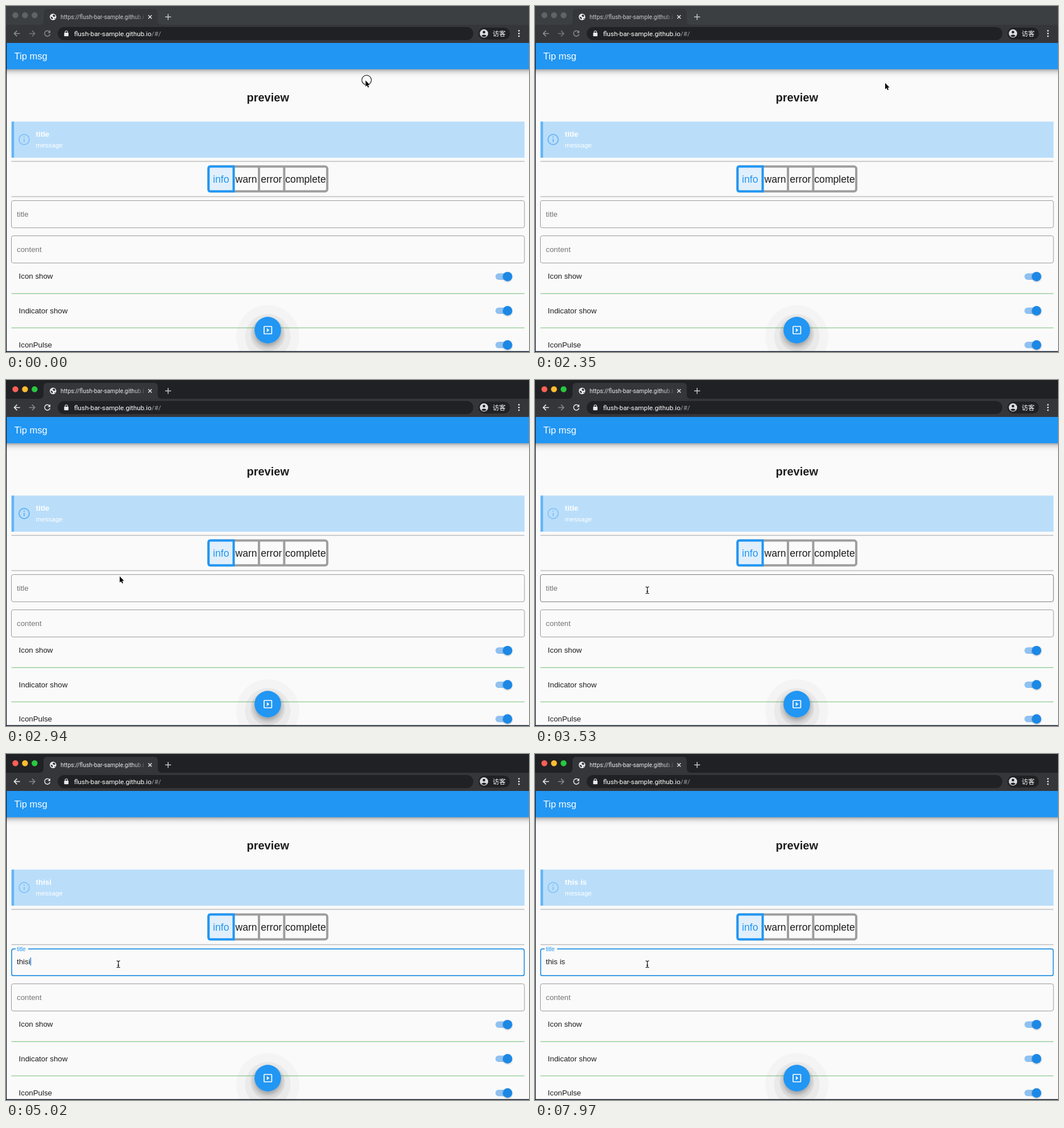
These frames come from a looping animation (920 by 609 pixels, 8000 ms). An HTML page:

```html
<!DOCTYPE html>
<html lang="en">
<head>
<meta charset="utf-8">
<title>Tip msg</title>
<style>
  html, body { margin: 0; width: 100%; height: 100%; overflow: hidden; background: #fafafa; }
  svg { display: block; width: 920px; height: 609px; }
  text { font-family: "Liberation Sans", Arial, sans-serif; font-size: 13.3px; fill: #1c1c1c; white-space: pre; }
  .ui { font-family: Roboto, sans-serif; }
  .line { fill: none; stroke: var(--icon); stroke-width: 1.5; }
  .chrome { --frame: #202124; --icon: #e8eaed; --dim: #85878a; --red: #ff5f57; --amber: #febc2e; --green: #28c840; }
  .chrome.idle { --frame: #3c3f42; --icon: #8d8f92; --dim: #73757a; --red: #616366; --amber: #616366; --green: #616366; }
  .tabtext { font-size: 10.3px; fill: #e8eaed; }
  .idle .tabtext { fill: #c8cacd; }
  .toggle text { font-size: 17.6px; text-anchor: middle; }
  .hint { fill: #757575; }
  .box { fill: none; stroke: #999; }
  .box.hover { stroke: #777; }
  .focus { fill: none; stroke: #2490e4; stroke-width: 1.7; }
</style>
</head>
<body>
<svg viewBox="0 0 920 609">
  <defs>
    <linearGradient id="barShade" x2="0" y2="1">
      <stop stop-color="#000" stop-opacity=".34"/>
      <stop offset=".3" stop-color="#000" stop-opacity=".14"/>
      <stop offset=".6" stop-color="#000" stop-opacity=".04"/>
      <stop offset="1" stop-color="#000" stop-opacity="0"/>
    </linearGradient>
    <linearGradient id="tabFade">
      <stop offset=".86" stop-color="#fff"/>
      <stop offset="1" stop-color="#fff" stop-opacity=".2"/>
    </linearGradient>
    <mask id="tabMask"><rect x="96" y="8" width="147" height="22" fill="url(#tabFade)"/></mask>
    <filter id="drop" x="-50%" y="-50%" width="200%" height="200%">
      <feDropShadow dx="0" dy="5" stdDeviation="4.5" flood-opacity=".3"/>
    </filter>
    <filter id="lift" x="-50%" y="-50%" width="200%" height="200%">
      <feDropShadow dx="0" dy="1" stdDeviation=".9" flood-opacity=".3"/>
    </filter>
    <g id="switch">
      <rect x="861" y="-5.7" width="27.5" height="11.4" rx="5.7" fill="#8fc1f1"/>
      <circle cx="882.3" cy="0" r="8.3" fill="#1e88e5" filter="url(#lift)"/>
    </g>
  </defs>

  <rect width="920" height="609" fill="#fafafa"/>

  <!-- page -->
  <rect y="111" width="920" height="15" fill="url(#barShade)"/>
  <rect y="64" width="920" height="47.3" fill="#2196f3"/>
  <text x="14.5" y="93.5" style="font-size:16.5px;fill:#fff">Tip msg</text>
  <text x="460.7" y="168" text-anchor="middle" style="font-size:20px;font-weight:700">preview</text>

  <rect x="9.7" y="203.5" width="902.5" height="63.5" fill="#badefa"/>
  <rect x="9.7" y="203.5" width="4.5" height="63.5" fill="#64b5f6"/>
  <g id="info" fill="none" stroke-width="2">
    <circle cx="31.9" cy="235" r="9"/>
    <path d="M31.9 234v5.5M31.9 229.8v2"/>
  </g>
  <text id="heading" x="52.6" y="230.3" style="font-weight:700;fill:#fff">title</text>
  <text x="52.6" y="249.3" style="font-size:11.65px;fill:#fff">message</text>

  <path d="M9.5 273.5H912M9.5 335.5H912" stroke="#bdbdbd" stroke-width="1.4"/>

  <g class="toggle">
    <g fill="none" stroke="#9e9e9e" stroke-width="4">
      <rect x="356.3" y="282.5" width="208.8" height="43.8" rx="4"/>
      <path d="M445 282V327M489.4 282V327"/>
    </g>
    <path d="M400.5 282.5H359.6q-3.3 0-3.3 3.3v37.2q0 3.3 3.3 3.3h40.9z" fill="#e1effc" stroke="#2196f3" stroke-width="4"/>
    <text x="378.3" y="311" style="fill:#2196f3">info</text>
    <text x="422.5" y="311">warn</text>
    <text x="466.8" y="311">error</text>
    <text x="527" y="311">complete</text>
  </g>

  <rect id="titleBox" class="box" x="9.5" y="342.5" width="902.5" height="47.8" rx="3.3"/>
  <path id="titleFocus" class="focus" d="M39 343.2H908.6q3 0 3 3v41q0 3-3 3H13q-3 0-3-3v-41q0-3 3-3h4"/>
  <text id="label" x="19" class="hint">title</text>
  <text id="typed" x="19" y="370"></text>
  <rect id="caret" width="1.5" fill="#2c86d8"/>
  <rect class="box" x="9.5" y="404.5" width="902.5" height="47.8" rx="3.3"/>
  <text class="hint" x="19" y="433">content</text>

  <path d="M9.5 506.3H912M9.5 566.5H912" stroke="#9bd09d" stroke-width="1.5"/>
  <text x="22.6" y="480.3">Icon show</text>
  <text x="22.6" y="540.5">Indicator show</text>
  <text x="22.6" y="600.7">IconPulse</text>
  <use href="#switch" y="476.2"/>
  <use href="#switch" y="536.4"/>
  <use href="#switch" y="596.6"/>

  <!-- floating button -->
  <g fill="#000">
    <circle cx="460.5" cy="582" r="55.5" fill-opacity=".022"/>
    <circle cx="460.5" cy="582" r="40" fill-opacity=".04"/>
    <circle cx="460.5" cy="578" r="30" fill-opacity=".05"/>
  </g>
  <circle cx="460.5" cy="570.5" r="23.4" fill="#2196f3" filter="url(#drop)"/>
  <rect x="454" y="564" width="13.4" height="13" rx=".8" fill="none" stroke="#fff" stroke-width="1.7"/>
  <path d="M458.8 566.9v7.2l4.4-3.6z" fill="#fff"/>

  <path d="M.5 64V609M0 608.3H920" stroke="#101c2b" stroke-width="1.4"/>

  <!-- browser window -->
  <g id="chrome" class="chrome">
    <rect width="920" height="34" fill="var(--frame)"/>
    <rect y="33" width="920" height="32" fill="#35363a"/>
    <path d="M59 33q7 0 7-7V12q0-7 7-7h187q7 0 7 7v14q0 7 7 7z" fill="#35363a"/>
    <circle cx="16.5" cy="16.2" r="5.2" fill="var(--red)"/>
    <circle cx="33.4" cy="16.2" r="5.2" fill="var(--amber)"/>
    <circle cx="50.3" cy="16.2" r="5.2" fill="var(--green)"/>
    <circle cx="82.7" cy="19.3" r="5.7" fill="#f1f3f4"/>
    <path d="M78.3 18.5l3.2 1.2 1.2 1.6-1 2.2-2.2-1.6zM83 15l3 .8.8 2.6-2.6.8-2.2-1.8zM85 21.5l2-.4-1.6 2.4z" fill="#35363a"/>
    <g mask="url(#tabMask)"><text class="ui tabtext" x="96" y="23">https://flush-bar-sample.github.io</text></g>
    <path d="M250.3 16.3l6 6m0-6l-6 6" stroke="#e8eaed" stroke-width="1.4"/>
    <path class="line" d="M280 19.3h10.4M285.2 14.1v10.4" style="stroke:#c4c6c9"/>
    <path class="line" d="M24.6 48.4H14.4m5-5l-5 5 5 5"/>
    <path class="line" d="M40.6 48.4h10.2m-5-5l5 5-5 5" style="stroke:var(--dim)"/>
    <path class="line" d="M76.4 45.2a4.8 4.8 0 1 0 1 4.3"/>
    <path d="M78 42.8v4.6h-4.6z" fill="var(--icon)"/>
    <rect x="91" y="37" width="731" height="23" rx="11.5" fill="#202124"/>
    <rect x="102.3" y="47" width="7.6" height="6.2" rx=".8" fill="#e8eaed"/>
    <path d="M104 47.5v-1.7a2.1 2.1 0 0 1 4.2 0v1.7" fill="none" stroke="#e8eaed" stroke-width="1.1"/>
    <text class="ui" x="119.7" y="52.6" style="font-size:11.75px;fill:#fff">flush-bar-sample.github.io<tspan fill="#9aa0a6">/#/</tspan></text>
    <rect x="831" y="38" width="55.5" height="21" rx="10.5" fill="#202124"/>
    <circle cx="840.8" cy="48.4" r="7.3" fill="#dadce0"/>
    <circle cx="840.8" cy="46" r="2.3" fill="#202124"/>
    <path d="M836.2 52.3q4.6-3.8 9.2 0q-4.6 4.6-9.2 0z" fill="#202124"/>
    <text x="856" y="52.6" style="font:11.4px 'Noto Sans CJK SC','Noto Sans CJK',sans-serif;fill:#fff">访客</text>
    <g fill="#e8eaed"><circle cx="902.3" cy="43.7" r="1.4"/><circle cx="902.3" cy="48.4" r="1.4"/><circle cx="902.3" cy="53.1" r="1.4"/></g>
  </g>

  <!-- pointer -->
  <circle id="ring" cx="634.3" cy="130.3" r="8.4" fill="none" stroke="#222" stroke-width="1.2"/>
  <path id="arrow" d="M0 0v10.9l2.5-2.3 1.7 3.9 1.8-.8-1.7-3.8h3.3z" fill="#000" stroke="#fff" stroke-width="1.2" paint-order="stroke"/>
  <path id="beam" d="M-3 -5.8q2.6 0 3 1.4q.4-1.4 3-1.4M-3 5.8q2.6 0 3-1.4q.4 1.4 3 1.4M0 -4.6V4.6M-1.5 1.8h3" fill="none" stroke="#111" stroke-width="1.2"/>
</svg>
<script>
  const LOOP = 8000;
  const $ = id => document.getElementById(id);
  const pen = document.createElement('canvas').getContext('2d');
  pen.font = '13.3px "Liberation Sans", Arial, sans-serif';

  // Each track holds [start, ...values]; a value stays until the next start.
  const pointer = [
    [0, 632.5, 131], [1030, 628, 132], [1180, 621, 133], [1320, 617.2, 134.6],
    [2060, 616.5, 135], [2350, 616, 135.6], [2650, 490, 225],
    [2790, 295, 328], [2940, 200, 345.6], [3090, 198.5, 350], [3230, 197.8, 366], [3380, 197.6, 370]
  ];
  const typing = [
    [0, ''], [4570, 'thi'], [4870, 'this'], [5010, 'thisi'], [5160, 'thisi '], [5310, 'thisi s'],
    [6050, 'thisi '], [6350, 'thisi'], [6490, 'this'], [6790, 'this '],
    [7080, 'this i'], [7230, 'this is'], [7520, 'this is ']
  ];
  const caretOn = [[0, 0], [3670, 1], [4120, 0], [4570, 1], [5760, 0], [6050, 1], [7970, 0]];
  const labelPose = [[0, 13.3, 370.7, '#757575'], [3670, 11.5, 358, '#2196f3'], [3820, 10, 347.2, '#2196f3']];
  const iconTint = [[0, '#84c2f6'], [2060, '#78bcf4'], [2210, '#6eb7f3'], [2500, '#64b2f1'], [3090, '#88c4f6']];

  const at = (track, t) => track.findLast(step => step[0] <= t).slice(1);
  const show = (id, on) => { $(id).style.display = on ? '' : 'none'; };

  function draw(t) {
    const [x, y] = at(pointer, t);
    const inField = t >= 3230, focused = t >= 3670;
    for (const id of ['arrow', 'beam']) $(id).setAttribute('transform', `translate(${x} ${y})`);
    show('arrow', !inField);
    show('beam', inField);
    show('ring', t < 150);
    $('chrome').classList.toggle('idle', t < 2500);
    $('info').setAttribute('stroke', at(iconTint, t)[0]);

    $('titleBox').classList.toggle('hover', inField);
    show('titleBox', !focused);
    show('titleFocus', focused);
    const [size, labelY, color] = at(labelPose, t);
    const label = $('label');
    label.style.fontSize = size + 'px';
    label.style.fill = color;
    label.setAttribute('y', labelY);

    const [text] = at(typing, t);
    $('typed').textContent = text;
    $('heading').textContent = text.trim() || 'title';
    const caret = $('caret');
    show('caret', at(caretOn, t)[0]);
    caret.setAttribute('x', 19 + pen.measureText(text).width);
    caret.setAttribute('y', text ? 358.3 : 360);
    caret.setAttribute('height', text ? 14 : 12);
  }

  const start = performance.now();
  function frame() {
    draw((performance.now() - start) % LOOP);
    requestAnimationFrame(frame);
  }
  draw(0);
  requestAnimationFrame(frame);
</script>
</body>
</html>
```
